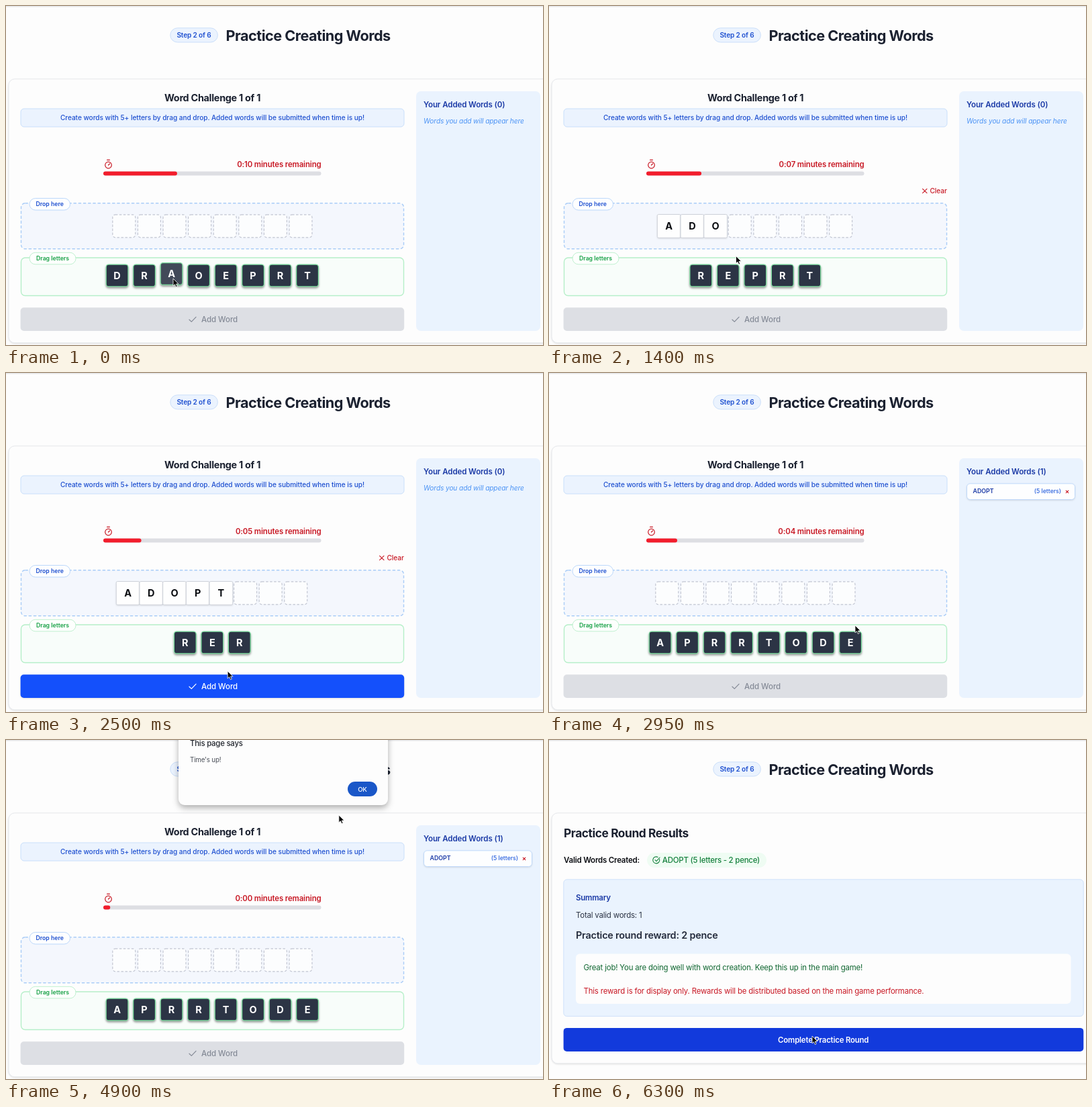
Animation of 800 by 505 pixels, one loop 6.35 s. Source, as an HTML page:

```html
<!DOCTYPE html>
<html lang="en">
<head>
<meta charset="utf-8">
<title>Practice Creating Words</title>
<style>
html, body { margin: 0; width: 100%; height: 100%; overflow: hidden; background: #fdfdfd; }
svg { display: block; width: 800px; height: 505px; font-family: Inter, "Open Sans", sans-serif; }
text { white-space: pre; }
.soft { filter: drop-shadow(0 1px 1px #0000001c); }
.tile { filter: drop-shadow(0 2px 1.5px #00000066); }
.lift { filter: drop-shadow(0 4px 5px #00000050); }
</style>
</head>
<body>
<svg id="stage" viewBox="0 0 800 505" width="800" height="505"></svg>
<script>
const LOOP = 6350, STEP = 50;
const ADDED = 2700, ALERT = 4800, RESULTS = 5250;
const BLUE = '#1450fb', BLUE_DARK = '#123adc', NAVY = '#1b3aa6', RED = '#c81824';
const MID = 307.3;

// seconds left on the clock: [time, seconds]
const clockKeys = [[0, 10.18], [750, 8.98], [2100, 6.11], [2950, 4.26], [4250, 1.94], [ALERT, 0.95]];

// tip of the pointer: [time, x, y]
const pointerKeys = [
  [0, 249, 406], [100, 249, 406], [300, 178, 338], [350, 178, 338],
  [500, 182, 410], [550, 182, 410], [750, 216, 339], [800, 216, 339],
  [1000, 248, 408], [1050, 248, 408], [1250, 249, 338], [1300, 249, 338],
  [1500, 308, 407], [1550, 308, 407], [1750, 285, 337], [1800, 285, 337],
  [2050, 367, 399], [2100, 367, 399], [2300, 320, 331], [2350, 320, 331],
  [2550, 332, 465], [2700, 332, 465], [2950, 456, 376], [3200, 456, 376],
  [3800, 207, 404], [3950, 207, 404], [4250, 271, 355], [4400, 271, 355],
  [5050, 531, 74], [5200, 531, 74], [5300, 522, 86], [5500, 522, 86],
  [6200, 392, 441], [LOOP, 392, 441]
];

// each drag: letter, its place in the tray, time picked up, time dropped
const drags = [
  { ch: 'A', from: 2, pick: 100, drop: 350 },
  { ch: 'D', from: 0, pick: 550, drop: 800 },
  { ch: 'O', from: 1, pick: 1050, drop: 1300 },
  { ch: 'P', from: 2, pick: 1550, drop: 1800 },
  { ch: 'T', from: 3, pick: 2100, drop: 2350 }
];
const stuck = { from: 1, start: 3900, end: 4450 };

const stage = document.getElementById('stage');
const linear = u => u;
const smooth = u => u * u * (3 - 2 * u);

function sample(keys, t, ease) {
  const last = keys[keys.length - 1];
  if (t >= last[0]) return last.slice(1);
  const i = keys.findIndex(k => k[0] > t);
  const a = keys[i - 1], b = keys[i];
  const u = ease((t - a[0]) / (b[0] - a[0]));
  return a.slice(1).map((v, j) => v + (b[j + 1] - v) * u);
}

const box = (x, y, w, h, r, fill, stroke = 'none', extra = '') =>
  `<rect x="${x}" y="${y}" width="${w}" height="${h}" rx="${r}" fill="${fill}" stroke="${stroke}" ${extra}/>`;

const line = (d, stroke, width = 1.2) =>
  `<path d="${d}" fill="none" stroke="${stroke}" stroke-width="${width}" stroke-linecap="round" stroke-linejoin="round"/>`;

function label(x, y, str, size, weight, fill, { anchor = 'start', track = -0.02, extra = '' } = {}) {
  return `<text x="${x}" y="${y}" font-size="${size}" font-weight="${weight}" fill="${fill}" ` +
    `text-anchor="${anchor}" letter-spacing="${track}em" ${extra}>${str}</text>`;
}
const centred = { anchor: 'middle' };

function header() {
  return box(0, 0, 800, 505, 0, '#fdfdfd') + box(0, 0, 800, 1.5, 0, '#e6e7ea') +
    box(244.8, 32.8, 70.6, 21.2, 10.6, '#ebf3fe', '#cbdffa') +
    label(280, 47.2, 'Step 2 of 6', 10.1, 600, '#1d4fd0', { anchor: 'middle', track: -0.015 }) +
    label(327.5, 51.7, 'Practice Creating Words', 21.7, 700, '#1b2130', { track: -0.025 });
}

const card = height => box(4, 108.8, 815, height, 9, '#fdfdfd', '#e6e8ec', 'class="soft"');

function tile(cx, cy, ch, raised, cls = 'tile') {
  return `<g class="${cls}">` + box(cx - 16.4, cy - 16.4, 32.8, 32.8, 4, raised ? '#424a59' : '#2c3445', '#7fe3a2', 'stroke-width="1.2"') + '</g>' +
    label(cx, cy + 5.2, ch, 14.5, 700, '#fff', { anchor: 'middle', track: 0 });
}

const trayX = (i, count) => MID + (i - (count - 1) / 2) * 40.5;

function slots(word) {
  const filled = 34.7, empty = 37.6;
  let x = MID + 0.1 - (word.length * filled + (8 - word.length) * empty) / 2;
  let out = '';
  for (let i = 0; i < 8; i++) {
    if (i < word.length) {
      out += box(x, 310.5, filled, 34.8, 2, '#fefefe', '#cdd1d9', 'class="soft"') +
        label(x + filled / 2, 333.2, word[i], 14.5, 700, '#0b0d12', { anchor: 'middle', track: 0 });
      x += filled;
    } else {
      out += box(x + 1.8, 310.8, 34, 34, 4, '#fcfdfe', '#c2c6d2', 'stroke-width="1.2" stroke-dasharray="3.6 2.4"');
      x += empty;
    }
  }
  return out;
}

function timer(t) {
  const [left] = sample(clockKeys, t, linear);
  const text = `0:${String(Math.floor(left)).padStart(2, '0')} minutes remaining`;
  return `<circle cx="152.5" cy="237" r="4.8" fill="none" stroke="${RED}" stroke-width="1.2"/>` +
    line('M150.6 229.4H154.4M152.5 237L154.5 235', RED) +
    label(469.5, 239.6, text, 11.4, 600, RED, { anchor: 'end', track: -0.011 }) +
    box(145, 246.5, 324.5, 6, 3, '#dddee3') +
    box(145, 246.5, left * 10.8, 6, 3, '#f21d2c');
}

function addButton(ready, hover) {
  const ink = ready ? '#fff' : '#858b97';
  const fill = ready ? (hover ? BLUE_DARK : BLUE) : '#dddfe4';
  return box(21.6, 449.2, 571.6, 34.8, 5, fill, 'none', ready ? 'class="soft"' : '') +
    line('M273 467.2L276.3 470.4L283 463.3', ink) +
    label(291, 471, 'Add Word', 11.5, 500, ink, { track: -0.005 });
}

function sidePanel(added) {
  let out = box(611, 127, 185, 357, 7, '#eaf3fe') +
    label(622, 151, `Your Added Words (${added ? 1 : 0})`, 11.5, 600, NAVY, { track: -0.007 });
  if (!added) {
    return out + label(622, 175, 'Words you add will appear here', 10.1, 400, '#4b93f5', { track: -0.008, extra: 'font-style="italic"' });
  }
  return out + box(622.5, 164.8, 161, 23.7, 5, '#fdfeff', '#bfd9fb', 'class="soft"') +
    label(631.5, 179.4, 'ADOPT', 8.8, 600, NAVY, { track: 0 }) +
    label(763, 179.4, '(5 letters)', 8.7, 500, '#2860dd', { anchor: 'end', track: 0 }) +
    line('M770.2 175.1L773.8 178.7M773.8 175.1L770.2 178.7', RED, 1.1);
}

function game(t, px, py) {
  const added = t >= ADDED;
  const done = added ? [] : drags.filter(d => t >= d.drop);
  const word = done.map(d => d.ch).join('');
  const tray = [...(added ? 'APRRTODE' : 'DRAOEPRT')];
  done.forEach(d => tray.splice(d.from, 1));

  const drag = drags.find(d => t > d.pick && t < d.drop);
  const held = drag ? drag.from : t >= stuck.start && t < stuck.end ? stuck.from : -1;
  const isOver = i => Math.abs(px - trayX(i, tray.length)) < 17 && Math.abs(py - 401.5) < 17;

  let out = card(393) +
    label(307.5, 142, 'Word Challenge 1 of 1', 14.4, 700, '#1b2130', centred) +
    box(22, 153, 571, 27, 5, '#ebf3fe', '#c9dffb') +
    label(307.5, 170.2, 'Create words with 5+ letters by drag and drop. Added words will be submitted when time is up!',
      10.1, 500, '#1d4fd0', { anchor: 'middle', track: -0.004 }) +
    timer(t);

  if (word) {
    out += line('M556.6 272.3L563 278.7M563 272.3L556.6 278.7', RED, 1.1) +
      label(593, 279.2, 'Clear', 10.1, 500, RED, { anchor: 'end', track: 0 });
  }

  out += box(22.5, 293.8, 570, 68, 6, '#f4f7fd', '#aacdf7', 'stroke-width="1.4" stroke-dasharray="4.4 2.8"') +
    box(35, 286.5, 60.5, 17.5, 8.75, '#fdfeff', '#bcd8fb') +
    label(65.2, 298.2, 'Drop here', 8.7, 600, '#1d4fd0', { anchor: 'middle', track: 0 }) +
    slots(word) +
    box(22.5, 375, 570, 56.5, 6, '#f8fdfa', '#b6efc9', 'stroke-width="1.4"') +
    box(35, 367.3, 69, 17.5, 8.75, '#fdfffd', '#c0f0d0') +
    label(69.5, 379.2, 'Drag letters', 8.7, 600, '#16a045', { anchor: 'middle', track: 0 });

  tray.forEach((ch, i) => {
    const raised = held >= 0 ? i === held : isOver(i);
    out += tile(trayX(i, tray.length), raised ? 399 : 401.5, ch, raised);
  });

  const overButton = px > 22 && px < 593 && py > 449 && py < 484;
  out += addButton(word.length >= 5, overButton) + sidePanel(added);

  if (drag) {
    const [gx, gy] = sample(pointerKeys, drag.pick, smooth);
    const x = px + trayX(drag.from, tray.length) - gx, y = py + 399 - gy;
    out += `<g opacity="0.92">${tile(x, y, drag.ch, true, 'lift')}</g>`;
  }
  return out;
}

function results(px, py) {
  const hover = px > 22 && px < 796 && py > 429 && py < 464;
  const green = '#15803d';
  return card(373) +
    label(22, 144.7, 'Practice Round Results', 17.35, 700, '#1b2130', { track: -0.025 }) +
    label(22, 183.2, 'Valid Words Created:', 11.5, 600, '#0b0d12', { track: -0.018 }) +
    box(146, 168, 178, 22, 11, '#effcf3') +
    line('M164.6 177.6A5 5 0 1 1 162 174.4M158 178.6L160 180.6L165 175', green, 1.1) +
    label(168.8, 183.2, 'ADOPT (5 letters - 2 pence)', 11.5, 500, green, { track: -0.022 }) +
    box(21.8, 207.8, 774.4, 203.8, 5, '#eaf3fe', '#cfe1fa') +
    label(40, 238.8, 'Summary', 11.5, 600, NAVY) +
    label(40, 264.8, 'Total valid words: 1', 11.5, 400, '#2c3445') +
    label(40, 296, 'Practice round reward: 2 pence', 14.4, 600, '#242b3b', { track: -0.014 }) +
    box(40, 318.5, 737.5, 74.5, 6, '#fdfdfd') +
    label(51.5, 342.8, 'Great job! You are doing well with word creation. Keep this up in the main game!', 11.4, 400, '#0f6630', { track: -0.015 }) +
    label(51.5, 377.5, 'This reward is for display only. Rewards will be distributed based on the main game performance.', 11.4, 400, RED, { track: -0.015 }) +
    box(21.6, 428.9, 774.7, 35.1, 5, hover ? BLUE_DARK : BLUE) +
    label(408.7, 450.8, 'Complete Practice Round', 11.4, 600, '#fff', { anchor: 'middle', track: -0.016 });
}

function alertBox(t) {
  const opacity = t < ALERT ? 0 : t < RESULTS ? 1 : t < RESULTS + STEP ? 0.3 : t < RESULTS + 2 * STEP ? 0.015 : 0;
  if (!opacity) return '';
  return `<g opacity="${opacity}"><g class="lift">${box(257, -14, 312, 111, 9, '#fdfdfd')}</g>` +
    label(274, 9, 'This page says', 11.4, 500, '#22262e') +
    label(274, 33, "Time's up!", 9.8, 400, '#4a4f58') +
    box(509, 62, 44, 22, 11, '#1a57c8') +
    label(531, 76.6, 'OK', 9.6, 500, '#fff', centred) + '</g>';
}

const pointer = (x, y) =>
  `<path transform="translate(${x} ${y})" d="M0 0V11L2.5 8.7L4.3 12.6L6.2 11.8L4.5 8H8Z" fill="#050505" stroke="#fff" stroke-width="0.8"/>`;

function draw(t) {
  const [px, py] = sample(pointerKeys, t, smooth);
  stage.innerHTML = header() + (t < RESULTS ? game(t, px, py) : results(px, py)) + alertBox(t) + pointer(px, py);
}

const start = performance.now();
let shown = -1;
function tick(now) {
  const t = Math.floor((Math.max(0, now - start) % LOOP) / STEP) * STEP;
  if (t !== shown) draw(shown = t);
  requestAnimationFrame(tick);
}
draw(shown = 0);
requestAnimationFrame(tick);
</script>
</body>
</html>
```
